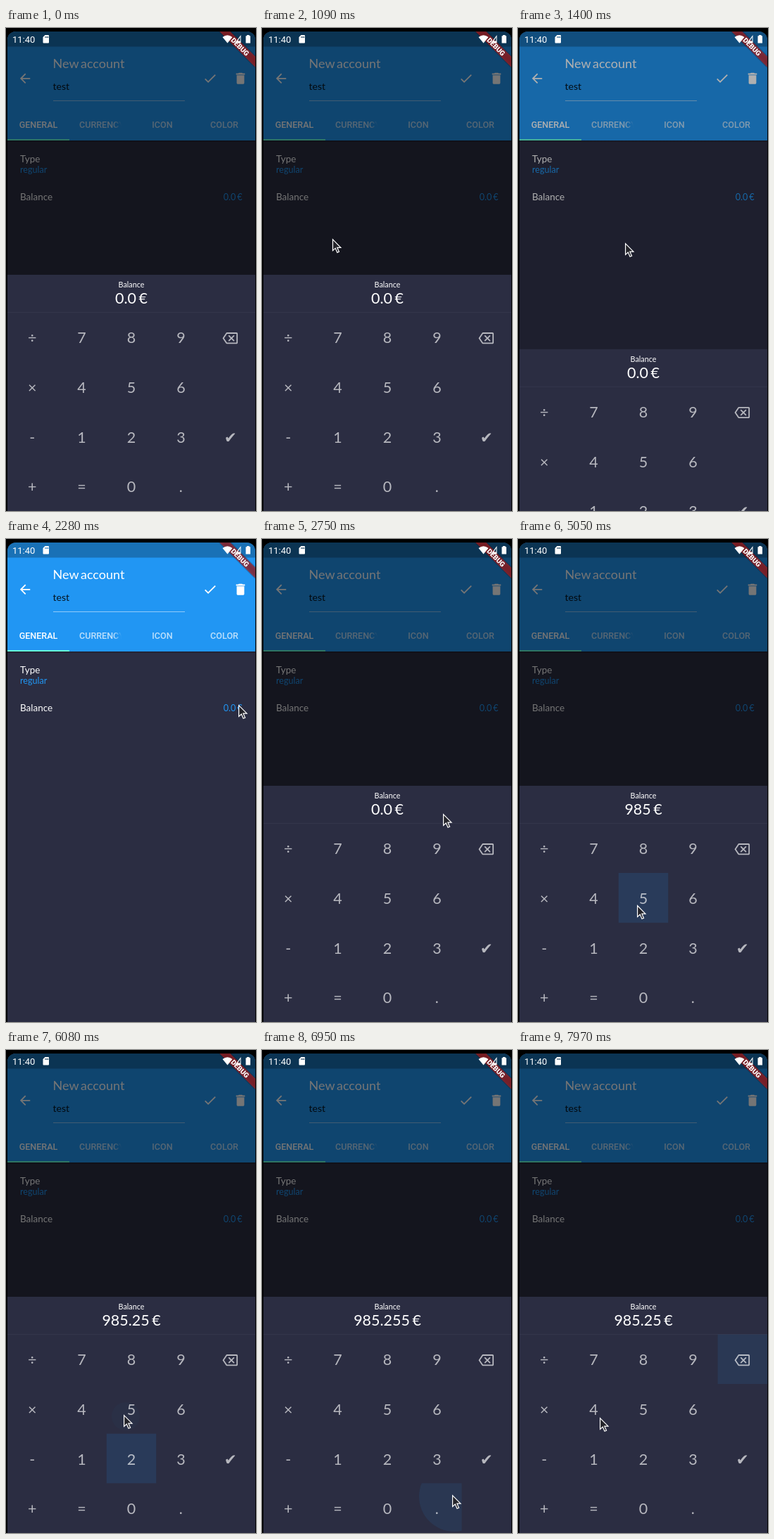
Recreate the animation shown at these times as an HTML page. Size 355 by 687 pixels, loop 8 s.

```html
<!DOCTYPE html>
<html lang="en">
<head>
<meta charset="utf-8">
<style>
  html, body { margin: 0; width: 100%; height: 100%; overflow: hidden; background: #000; }
  svg { display: block; }
  text { font-family: Lato, "DejaVu Sans", sans-serif; fill: #fff; word-spacing: -.1em; }
  .tab { font: 500 12.57px Roboto, sans-serif; text-anchor: middle; }
  .mid { text-anchor: middle; }
  .off { fill-opacity: .7; }
  .blue { fill: #2196f3; }
</style>
</head>
<body>
<svg id="stage" width="355" height="687" viewBox="0 0 355 687">
  <defs>
    <clipPath id="phone"><path d="M2 687V17a12 12 0 0 1 12-12H342a12 12 0 0 1 12 12V687z"/></clipPath>
    <linearGradient id="fade" gradientUnits="userSpaceOnUse" x1="153" x2="164">
      <stop stop-color="#fff" stop-opacity=".7"/><stop offset="1" stop-color="#fff" stop-opacity="0"/>
    </linearGradient>
    <linearGradient id="shade" x2="0" y2="1">
      <stop stop-opacity=".3"/><stop offset="1" stop-opacity="0"/>
    </linearGradient>
    <filter id="blur"><feGaussianBlur stdDeviation="2.5"/></filter>
  </defs>

  <g clip-path="url(#phone)">
    <rect width="355" height="687" fill="#2b2d42"/>
    <rect y="160" width="355" height="3" fill="url(#shade)"/>
    <rect width="355" height="160" fill="#2196f3"/>
    <rect width="355" height="26.5" fill-opacity=".25"/>

    <g fill="#fff">
      <path transform="translate(16.3 61) scale(.898)" d="M20 11H7.83l5.59-5.59L12 4l-8 8 8 8 1.41-1.41L7.83 13H20z"/>
      <path transform="translate(279 61) scale(.898)" d="M9 16.17L4.83 12l-1.42 1.41L9 19 21 7l-1.41-1.41z"/>
      <path transform="translate(322.2 61) scale(.898)" d="M6 19c0 1.1.9 2 2 2h8c1.1 0 2-.9 2-2V7H6zM19 4h-3.5l-1-1h-5l-1 1H5v2h14z"/>
    </g>
    <text x="66.5" y="57" font-size="18">New account</text>
    <text x="66.5" y="88" font-size="14" style="fill:#000;fill-opacity:.87">test</text>
    <path d="M67 103.5H254" stroke="#fff" stroke-opacity=".5"/>

    <text class="tab" x="46" y="141.5">GENERAL</text>
    <text class="tab" x="104" y="141.5" style="text-anchor:start;fill:url(#fade)">CURRENCY</text>
    <text class="tab off" x="222" y="141.5">ICON</text>
    <text class="tab off" x="310" y="141.5">COLOR</text>
    <rect x="2" y="158" width="88" height="2" fill="#64ffda"/>

    <text x="20" y="190.5" font-size="13.5">Type</text>
    <text class="blue" x="20" y="206" font-size="12.6">regular</text>
    <text x="20" y="245" font-size="13.5">Balance</text>
    <text class="blue" x="335.5" y="244.5" font-size="12.6" text-anchor="end">0.0 €</text>

    <rect id="scrim" width="355" height="687"/>

    <g id="sheet">
      <rect y="351" width="355" height="336" fill="#2b2d42"/>
      <path d="M2 404.5H354" stroke="#34364b"/>
      <text class="mid" x="178" y="369" font-size="10.8">Balance</text>
      <text class="mid" id="amount" x="178" y="392" font-size="21.5"></text>
      <g id="ripples"></g>
      <g id="keys" class="mid" font-size="21.5" opacity=".66">
        <path transform="translate(307.5 430.4) scale(.898)" fill="#fff" d="M22 3H7c-.69 0-1.23.35-1.59.88L0 12l5.41 8.11c.36.53.9.89 1.59.89h15c1.1 0 2-.9 2-2V5c0-1.1-.9-2-2-2zm0 16H7.07L2.4 12l4.66-7H22zM10.41 17L14 13.41 17.59 17 19 15.59 15.41 12 19 8.41 17.59 7 14 10.59 10.41 7 9 8.41 12.59 12 9 15.59z"/>
      </g>
    </g>

    <g transform="translate(354 5) rotate(45) scale(.898)">
      <rect x="-40" y="28" width="80" height="12" fill-opacity=".45" filter="url(#blur)"/>
      <rect x="-40" y="28" width="80" height="12" fill="#b71c1c" fill-opacity=".63"/>
      <text class="mid" y="38" style="font:900 11px Roboto,sans-serif">DEBUG</text>
    </g>

    <g fill="#fff">
      <text x="9" y="21" style="font:400 13px Roboto,sans-serif">11:40</text>
      <path fill-rule="evenodd" d="M55.5 10H60q1 0 1 1v9.5q0 1-1 1H53.5q-1 0-1-1V13zM55.5 12v2h1v-2zm1.8 0v2h1v-2zm1.8 0v2h1v-2z"/>
      <path d="M314.5 21.5L307.5 13q7-5.5 14 0z"/>
      <path fill-rule="evenodd" d="M333.5 10V21.5H325zM332.5 13V18.5H329z"/>
      <path d="M342 11.2V10h3.5v1.2H347V21.5H340.5V11.2z"/>
    </g>
  </g>

  <path id="cursor" d="M.6.6V16.5l3.7-3.4 2.7 6.2 2.6-1.1-2.7-6H12z" fill="#24242a" stroke="#fff" stroke-width="1.2"/>
</svg>

<script>
const $ = id => document.getElementById(id);
const clamp = x => Math.min(1, Math.max(0, x));
const LOOP = 8000, LEFT = 2, TOP = 404.5, WIDE = 70.4, HIGH = 70.6;
const keys = ["÷789⌫", "×456 ", "-123✔", "+=0. "];

// Where the pointer is due: time, x, y. Every stop on the keypad but the last is a tap.
const stops = [[840, 20, 291], [1320, 152, 306], [2430, 330, 236], [2750, 257, 391], [3490, 319, 438],
  [4090, 244, 428], [4570, 172, 432], [4880, 166, 515], [5610, 233, 648], [5890, 172, 588],
  [6060, 167, 519], [6470, 167, 519], [6870, 270, 633], [7730, 313, 432], [LOOP, 116, 523]];

function add(parent, tag, attrs) {
  const el = document.createElementNS("http://www.w3.org/2000/svg", tag);
  for (const name in attrs) el.setAttribute(name, attrs[name]);
  return parent.appendChild(el);
}

function bezier(x1, y1, x2, y2) {
  const at = (s, a, b) => 3 * s * (1 - s) * ((1 - s) * a + s * b) + s ** 3;
  return x => {
    let lo = 0, hi = 1;
    for (let i = 0; i < 20; i++) {
      const m = (lo + hi) / 2;
      if (at(m, x1, x2) < x) lo = m; else hi = m;
    }
    return at(hi, y1, y2);
  };
}
const ease = bezier(.25, .1, .25, 1), slide = bezier(0, 0, .2, 1);

// The pointer rests a little at both ends of each leg.
function cursorAt(t) {
  const i = Math.max(1, stops.findIndex(s => s[0] > t));
  const [t0, x0, y0] = stops[i - 1], [t1, x1, y1] = stops[i];
  const k = clamp(((t - t0) / (t1 - t0) - .15) / .65), p = k * k * (3 - 2 * k);
  return [x0 + (x1 - x0) * p, y0 + (y1 - y0) * p];
}

function type(text, key) {
  if (key === "⌫") return text.slice(0, -1).replace(/\.$/, "");
  if (key === "." && text.includes(".")) return text;
  return text === "0" ? key : text + key;
}

keys.forEach((line, r) => [...line.replace("⌫", " ")].forEach((key, c) => {
  add($("keys"), "text", { x: LEFT + WIDE * (c + .5), y: TOP + HIGH * (r + .5) + 8.5 }).textContent = key;
}));

let typed = "0.0";
const taps = stops.slice(0, -1).filter(s => s[2] > TOP).map(([time, px, py]) => {
  const col = Math.floor((px - LEFT) / WIDE), row = Math.floor((py - TOP) / HIGH);
  const x = LEFT + col * WIDE, y = TOP + row * HIGH;
  const cell = add($("ripples"), "svg", { x, y, width: WIDE, height: HIGH, overflow: "hidden" });
  const circle = add(cell, "circle", { cx: px - x + 3, cy: py - y + 2, fill: "#2196f3" });
  typed = type(typed, keys[row][col]);
  return { time, circle, typed };
});

function draw(t) {
  const open = t < 2000 ? 1 - clamp((t - 1300) / 150) : clamp((t - 2400) / 250);
  $("scrim").setAttribute("opacity", .54 * ease(open));
  $("sheet").setAttribute("transform", `translate(0 ${336 * (1 - slide(open))})`);

  const last = taps.findLast(tap => tap.time <= t);
  $("amount").textContent = (last ? last.typed : "0.0") + " €";

  for (const { time, circle } of taps) {
    const age = t - time;
    circle.setAttribute("r", 10 + 90 * clamp(age / 180));
    circle.setAttribute("opacity", .135 * clamp(age / 120) * clamp((400 - age) / 220));
  }

  const [x, y] = cursorAt(t);
  $("cursor").setAttribute("transform", `translate(${x} ${y})`);
  $("cursor").setAttribute("visibility", t < stops[0][0] ? "hidden" : "visible");
}

let began;
function loop(now) {
  began ??= now;
  draw((now - began) % LOOP);
  requestAnimationFrame(loop);
}
draw(0);
requestAnimationFrame(loop);
</script>
</body>
</html>
```
